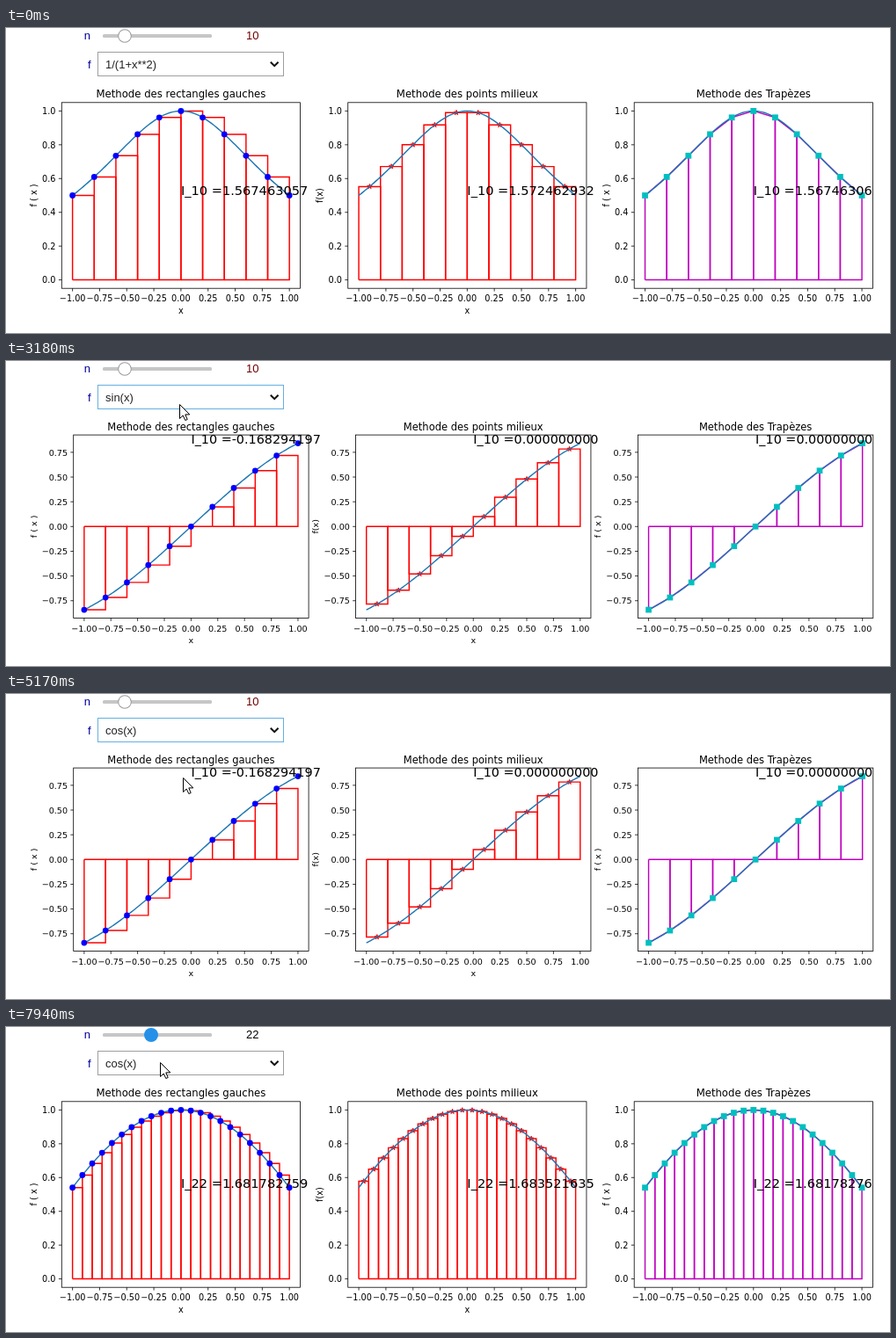
An HTML page with a canvas that plays this animation: 1005 by 347 pixels, repeating every 8 s.

```html
<!DOCTYPE html>
<html lang="fr">
<head>
<meta charset="utf-8">
<title>Methodes d'integration</title>
<style>
html, body { margin: 0; width: 100%; height: 100%; overflow: hidden; background: #fff; }
canvas { display: block; }
</style>
</head>
<body>
<canvas id="stage" width="1005" height="347"></canvas>
<script>
const ctx = document.getElementById('stage').getContext('2d');
const LOOP = 8000, STEP = 70;
const UI = '13px "Liberation Sans", Arial, sans-serif';
const CURVE = '#1f77b4', RED = '#ff0000';

const names = ['1/(1+x**2)', 'sin(x)', 'cos(x)', 'x**2-x+5'];
const funcs = [x => 1 / (1 + x * x), Math.sin, Math.cos];

// Figure layouts: left edge, top edge, scale, y limits and y tick step
const wide = { left: 63.3, top: 84.8, k: 0.9722, lo: 0, hi: 1, tick: 0.2, digits: 1, label: 28.5 };
const tight = { left: 76.7, top: 84.1, k: 0.9585, lo: -Math.sin(1), hi: Math.sin(1), tick: 0.25, digits: 2, label: 42.2 };

// Pointer keys: time, x, y
const path = [
  [200, 664, 317], [820, 207, 46], [1019, 207, 46], [1020, 208, 46],
  [1370, 208, 46], [1780, 212, 82], [2570, 212, 82], [2640, 210, 74],
  [3380, 195, 46], [3450, 195, 45], [3520, 195, 43], [4050, 195, 43],
  [4120, 196, 48], [4470, 201, 90], [4750, 201, 95], [6290, 201, 95],
  [6850, 162, 9], [7450, 162, 9], [7940, 175, 40]
];
const clicks = [[1170, 1370], [2040, 2240], [3720, 3920], [4950, 5170], [7040, 7240]];

const within = (t, a, b) => t >= a && t < b;
const format = (v, d) => v.toFixed(d).replace(/^-(0\.0+)$/, '$1');
const tickText = (v, d) => format(v, d).replace('-', '\u2212');

function text(s, x, y, font, color = '#000', align = 'left') {
  ctx.font = font;
  ctx.fillStyle = color;
  ctx.textAlign = align;
  ctx.fillText(s, x, y);
}

function line(points, color, width) {
  ctx.beginPath();
  points.forEach(p => ctx.lineTo(...p));
  ctx.strokeStyle = color;
  ctx.lineWidth = width;
  ctx.stroke();
}

function disc(x, y, r, color) {
  ctx.beginPath();
  ctx.arc(x, y, r, 0, 2 * Math.PI);
  ctx.fillStyle = color;
  ctx.fill();
}

function star(x, y, r) {
  ctx.beginPath();
  for (let i = 0; i < 10; i++) {
    const a = i * Math.PI / 5, q = i % 2 ? r * 0.382 : r;
    ctx.lineTo(x + q * Math.sin(a), y - q * Math.cos(a));
  }
  ctx.closePath();
  ctx.fillStyle = ctx.strokeStyle = RED;
  ctx.lineWidth = 0.9;
  ctx.fill();
  ctx.stroke();
}

function drawPanel(index, fn, n, fig) {
  const { k, top, lo, hi } = fig;
  const w = 278.96 * k, h = 217.44 * k, left = fig.left + index * w * 1.2;
  const bottom = top + h, mid = left + w / 2;
  const X = x => mid + x * w / 2.2;
  const Y = y => bottom - h / 22 - (y - lo) / (hi - lo) * h / 1.1;
  const font = size => `${size * k}px "DejaVu Sans", Verdana, sans-serif`;
  const lw = 1.5 * k, dx = 2 / n, at = i => -1 + i * dx;

  // Bars and their sum
  const edge = index === 2 ? '#bf00bf' : RED;
  let sum = 0;
  for (let i = 0; i < n; i++) {
    const a = at(i), b = at(i + 1);
    const ya = index === 1 ? fn(a + dx / 2) : fn(a);
    const yb = index === 2 ? fn(b) : ya;
    sum += dx * (ya + yb) / 2;
    line([[X(a), Y(0)], [X(a), Y(ya)], [X(b), Y(yb)], [X(b), Y(0)], [X(a), Y(0)]], edge, lw);
  }

  // Markers and curve
  if (index === 1) for (let i = 0; i < n; i++) {
    const x = at(i + 0.5);
    star(X(x), Y(fn(x)), 3 * k);
  }
  const curve = [];
  for (let i = 0; i <= 100; i++) curve.push([X(i / 50 - 1), Y(fn(i / 50 - 1))]);
  line(curve, CURVE, lw);
  if (index !== 1) for (let i = 0; i <= n; i++) {
    const x = X(at(i)), y = Y(fn(at(i))), r = 3.5 * k;
    if (index === 0) disc(x, y, r, '#0000ff');
    else {
      ctx.fillStyle = '#00bfbf';
      ctx.fillRect(x - r, y - r, 2 * r, 2 * r);
    }
  }

  // Frame, ticks and labels
  ctx.strokeStyle = '#000';
  ctx.lineWidth = 0.8;
  ctx.strokeRect(left, top, w, h);
  for (let v = -1; v <= 1; v += 0.25) {
    line([[X(v), bottom], [X(v), bottom + 3.5 * k]], '#000', 0.8);
    text(tickText(v, 2), X(v), bottom + 15, font(10), '#000', 'center');
  }
  for (let i = Math.ceil(lo / fig.tick); i * fig.tick <= hi + 1e-9; i++) {
    const v = i * fig.tick;
    line([[left - 3.5 * k, Y(v)], [left, Y(v)]], '#000', 0.8);
    text(tickText(v, fig.digits), left - 7 * k, Y(v) + 3.7, font(10), '#000', 'right');
  }
  const title = ['rectangles gauches', 'points milieux', 'Trapèzes'][index];
  text('Methode des ' + title, mid, top - 5.5, font(12), '#000', 'center');
  if (index < 2) text('x', mid, bottom + 28.5, font(10), '#000', 'center');
  ctx.save();
  ctx.translate(left - fig.label, top + h / 2);
  ctx.rotate(-Math.PI / 2);
  text(index === 1 ? 'f(x)' : 'f ( x )', 0, 0, font(10), '#000', 'center');
  ctx.restore();
  text(`I_${n} =${format(sum, index === 2 ? 8 : 9)}`, X(0), Y(fn(1)), font(15));
}

function drawControls(t, chosen) {
  const moved = t >= 7040;
  text('n', 96, 13, UI, '#00009a', 'right');
  text('f', 96.5, 46, UI, '#00009a', 'right');
  text(moved ? '22' : '10', 273, 13, UI, moved ? '#000' : '#700000');

  ctx.fillStyle = '#c6c6c6';
  ctx.beginPath();
  ctx.roundRect(110, 7, 124, 4, 1.5);
  ctx.fill();
  if (moved) disc(165, 9, 8, '#2590e8');
  else {
    disc(135, 9, 7.8, '#9a9a9a');
    disc(135, 9, 6.8, '#fff');
  }

  ctx.fillStyle = '#fff';
  ctx.fillRect(104, 27, 212, 28);
  ctx.strokeStyle = within(t, 1170, 7040) ? '#64b0e0' : '#9e9e9e';
  ctx.lineWidth = 1;
  ctx.strokeRect(104.5, 27.5, 211, 27);
  text(names[chosen], 113, 46, UI, '#222');
  line([[300.8, 38.8], [305.2, 43.2], [309.6, 38.8]], '#111', 2);
}

function drawMenu(row, alpha) {
  ctx.save();
  ctx.globalAlpha = alpha;
  ctx.shadowColor = 'rgba(0,0,0,.35)';
  ctx.shadowBlur = 8;
  ctx.shadowOffsetY = 3;
  ctx.fillStyle = '#fff';
  ctx.fillRect(104, 55, 212, 69);
  ctx.shadowColor = 'transparent';
  ctx.strokeStyle = '#767676';
  ctx.lineWidth = 1;
  ctx.strokeRect(104.5, 54.5, 211, 69);
  ctx.fillStyle = '#1e90ff';
  ctx.fillRect(105, Math.round(55.5 + row * 16.7), 210, 17);
  names.forEach((s, i) => text(s, 113, Math.round(68 + i * 16.7), UI, i === row ? '#fff' : '#222'));
  ctx.restore();
}

function pointerAt(t) {
  let i = 0;
  while (i < path.length - 1 && path[i + 1][0] <= t) i++;
  const [t0, x0, y0] = path[i], [t1, x1, y1] = path[i + 1] || path[i];
  if (t1 === t0) return [x0, y0];
  const p = Math.floor((t - t0) / STEP) * STEP / (t1 - t0);
  const e = 1 - (1 - p) ** 2;
  return [Math.round(x0 + (x1 - x0) * e), Math.round(y0 + (y1 - y0) * e)];
}

function drawPointer(x, y) {
  ctx.save();
  ctx.translate(x + 0.5, y + 0.5);
  ctx.beginPath();
  [[0, 0], [0, 16], [3.7, 12.5], [6.3, 18], [8.7, 17], [6.3, 11.4], [11.3, 11.4]]
    .forEach(p => ctx.lineTo(...p));
  ctx.closePath();
  ctx.fillStyle = '#fff';
  ctx.strokeStyle = '#000';
  ctx.lineWidth = 1;
  ctx.fill();
  ctx.stroke();
  ctx.restore();
}

function draw(t) {
  const chosen = t < 2240 ? 0 : t < 5170 ? 1 : 2;
  const plotted = t < 2990 ? 0 : t < 5900 ? 1 : 2;
  const n = t < 7800 ? 10 : 22;
  const [x, y] = pointerAt(t);

  ctx.fillStyle = '#fff';
  ctx.fillRect(0, 0, 1005, 347);
  for (let i = 0; i < 3; i++) drawPanel(i, funcs[plotted], n, plotted === 1 ? tight : wide);
  drawControls(t, chosen);
  if (within(t, 1240, 2310) || within(t, 3720, 5170)) {
    const row = y >= 55 ? Math.floor((y - 55) / 17) : chosen;
    drawMenu(row, within(t, 2240, 2310) ? 0.5 : 1);
  }
  if (clicks.some(c => within(t, ...c))) disc(x, y, 12, 'rgba(255,240,20,.6)');
  if (t >= 200) drawPointer(x, y);
}

const start = performance.now();
function frame() {
  draw((performance.now() - start) % LOOP);
  requestAnimationFrame(frame);
}
frame();
</script>
</body>
</html>
```
